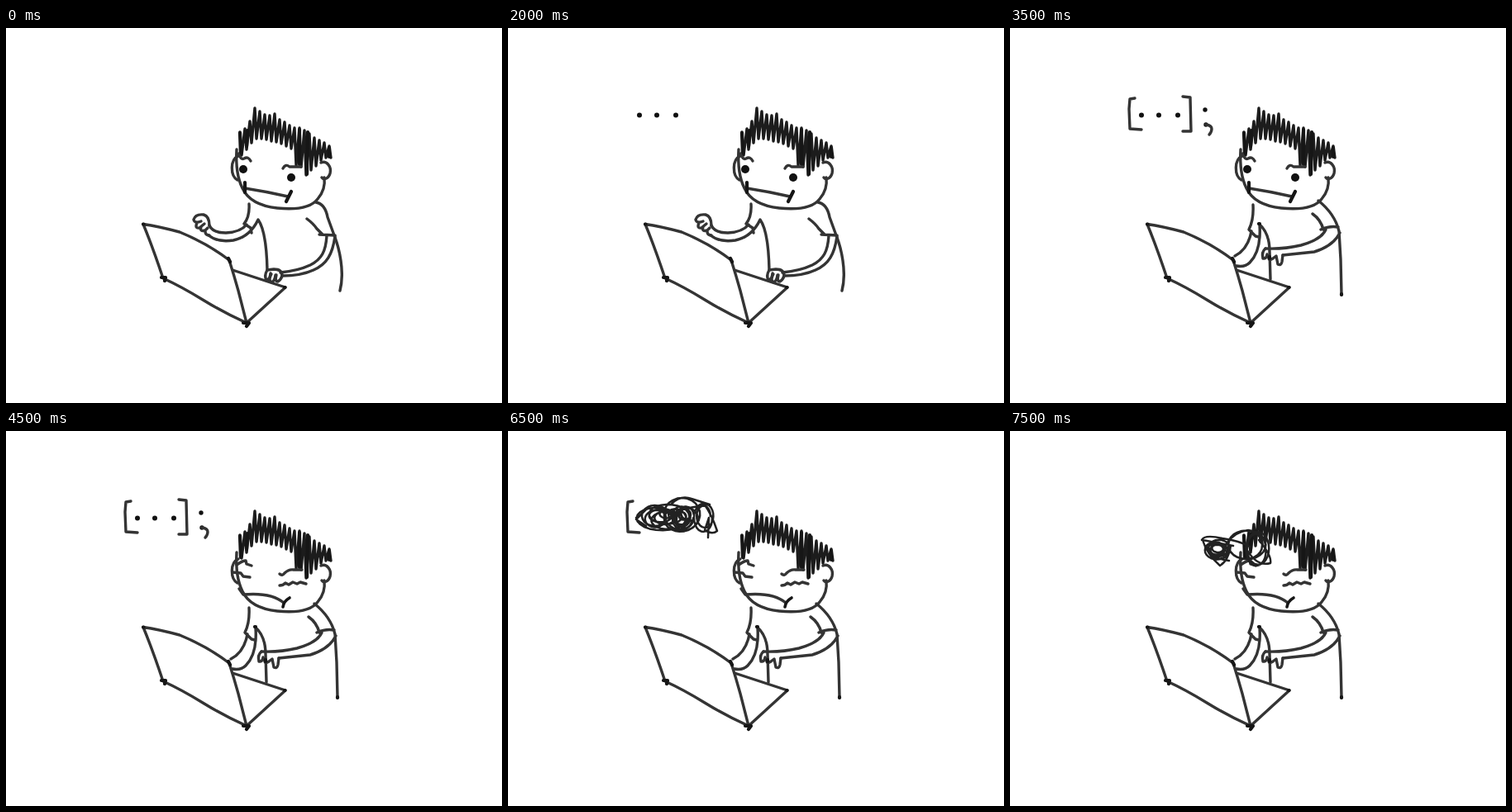
These frames come from a looping animation (600 by 454 pixels, 8000 ms). An HTML page:

```html
<!DOCTYPE html>
<html lang="en">
<head>
<meta charset="utf-8">
<title>Typing</title>
<style>
html, body { margin: 0; width: 100%; height: 100%; overflow: hidden; background: #fff; }
svg { display: block; width: 100vw; height: 100vh; }
.line { fill: none; stroke: #343434; stroke-width: 3.4; stroke-linecap: round; stroke-linejoin: round; filter: blur(0.55px); }
.dot { stroke: none; fill: #111; }
.bold { stroke: #161616; stroke-width: 4.2; }
.scrawl { stroke: #222; stroke-width: 2.5; }
</style>
</head>
<body>
<svg viewBox="0 0 600 454">
<g class="line">
  <!-- laptop -->
  <path d="M166 237.500Q184 240 210 247Q244 261 270 281Q276 300 281 318L291 357 338 314 274 293M166 237.500Q177 264 190 303Q212 313 238 329T291 357"/>
  <path class="bold" d="M166 237.500h.5M269 279l2 4M188 302l5 0-1 4M287 357l7 0-3 4M337 314h.5"/>

  <!-- head -->
  <path d="M279 147C278 164 279 180 286 194C293 209 310 216 328 218C348 220 368 219 377 207C384 199 386 189 385 181"/>
  <path d="M281 155C271 159 271 179 280 184M381 163C388 160 394 168 392 176C390 183 384 184 382 181"/>
  <path id="hair" style="stroke:#1c1c1c"/>
  <path class="bold" d="M283 127L284 153M292 124L291 143M355 123L355 165M365 126L364 177M391 145V156"/>

  <g id="smug">
    <path d="M281 152Q284 160 288 158Q293 155 296 161M335 170Q338 164 343 168L357 168M289 194Q315 198 341 204"/>
    <path class="bold" d="M289 187V199M345 198L339 210"/>
    <circle class="dot" cx="287" cy="171" r="5"/><circle class="dot" cx="345" cy="181" r="5"/>
  </g>
  <g id="cross">
    <path d="M279 162Q286 157 290 157L291 161 297 163M274 171L284 172 287 176 295 177"/>
    <path d="M331 173Q334 176 337 172Q342 167 348 168L358 168M331 187Q335 187 338 184L342 186 347 183 352 185 356 183 363 185"/>
    <path d="M282 191L287 198Q321 195 336 208"/>
    <path class="bold" style="stroke-width:3.600" d="M335 213Q336 206 343 202"/>
  </g>

  <g id="lifted">
    <path d="M294 213Q295 228 288 237L296 242 297 248M291 238Q284 247 266 248Q250 248 246 239M245 251Q256 260 275 257Q295 253 305 232Q315 246 316 293"/>
    <path d="M246 239Q246 228 239 226Q229 225 227 232Q228 237 236 234M231 236Q228 243 234 242L240 237M236 241Q234 247 241 245L244 242M241 246Q241 251 246 251"/>
    <path d="M375 211Q386 213 389 229L397 251C403 266 410 295 404 318M364 231Q372 237 376 243L383 250M379 250L398 251"/>
    <path d="M388 251C387 270 382 280 368 287Q353 294 332 296M398 252C395 274 388 286 372 293Q357 300 334 300"/>
    <path d="M334 300Q334 292 324 292L316 293Q312 300 315 305Q319 305 320 297M321 298Q317 305 321 308Q325 307 326 299M327 299Q325 307 329 307Q333 304 334 300"/>
  </g>
  <g id="lowered">
    <path d="M294 214Q295 232 289 244L297 252 301 253M292 246Q288 268 272 276M302 239Q304 270 290 284Q284 290 274 288M301 237Q314 248 314 270L315 304"/>
    <path d="M373 209Q393 225 398 246L400 280 401 323M366 225Q376 232 379 244M376 244Q387 239 397 241M382 244Q377 256 352 263Q331 268 309 267M399 248Q391 264 368 271L330 275"/>
    <path d="M309 267Q304 271 306 279Q310 280 311 274M313 276Q312 283 318 279L322 276 324 286Q328 288 329 283L330 275"/>
    <path class="bold" d="M301 237h1M401 322v1M314 277v2"/>
  </g>

  <circle id="dot1" class="dot" cx="159" cy="105.500" r="3"/>
  <circle id="dot2" class="dot" cx="180" cy="105.500" r="3"/>
  <circle id="dot3" class="dot" cx="203" cy="105.500" r="3"/>
  <path id="open" d="M151 85L145 86 144 98 145 122 159 123"/>
  <path id="close" d="M209 83L218 84 219 125 209 125"/>
  <g id="semi">
    <circle class="dot" cx="236" cy="99" r="2.700"/><circle class="dot" cx="237" cy="117" r="2.700"/>
    <path d="M237 117Q244 118 244 122Q244 126 241 129"/>
  </g>
  <g id="scrawls"></g>
</g>
</svg>
<script>
const $ = id => document.getElementById(id);

// Hair: one zigzag between an upper and a lower outline
const tips = [126, 122, 113, 97, 101, 105, 106, 104, 111, 114, 118, 121, 121, 124, 128, 133, 136, 139, 143];
const roots = [154, 147, 139, 134, 134, 135, 137, 138, 140, 143, 146, 166, 168, 178, 172, 167, 160, 157, 157];
$("hair").setAttribute("d", tips.map((y, i) => {
  const x = 283 + i * 6;
  return `${i ? "L" : "M"}${x} ${y}L${x + 2} ${roots[i]}`;
}).join(""));

// Wobbling loops around an ellipse
function loops(cx, cy, rx, ry, turns, wobble = 0.35) {
  let d = "";
  for (let i = 0; i <= turns * 24; i++) {
    const a = i * Math.PI / 12;
    const r = 1 - wobble * (0.5 + 0.5 * Math.sin(a * 0.37 + cx));
    const x = cx + rx * (r * Math.cos(a) + wobble * 0.4 * Math.sin(a * 0.23));
    const y = cy + ry * (r * Math.sin(a) + wobble * 0.3 * Math.cos(a * 0.31));
    d += `${i ? "L" : "M"}${x.toFixed(1)} ${y.toFixed(1)}`;
  }
  return d;
}

const rightKnot = loops(207, 98, 10, 14, 2, 0.2) + loops(215, 109, 9, 15, 3)
  + loops(217, 108, 5, 10, 5) + "M206 119Q205 130 212 129L223 112";
const leftKnot = "M163 106L176 98Q178 108 173 117L164 107 176 104 170 111 175 114"
  + "M173 102Q178 92 189 95Q194 99 188 105Q180 109 176 104Q182 97 184 105M179 107Q195 111 203 98";
const bridge = loops(188, 105, 24, 14, 3) + loops(205, 104, 20, 18, 3);
const cloud = loops(188, 105, 31, 16, 3, 0.5) + loops(208, 105, 24, 21, 3, 0.5)
  + loops(176, 105, 18, 14, 2) + loops(212, 103, 12, 13, 5, 0.6)
  + loops(187, 103, 15, 9, 3, 0.6) + loops(236, 104, 12, 17, 2, 0.3)
  + "M168 94L155 107 167 115M155 105l2 5M198 88Q209 77 222 82L244 89 213 94"
  + "M237 88Q247 102 253 121Q247 126 238 120L243 105 242 129";
const drifting = loops(212, 116, 31, 18, 3) + loops(239, 123, 28, 18, 3)
  + loops(220, 117, 17, 10, 4) + "M181 112L196 102 239 104";
const landed = "M270 139Q245 134 232 132Q235 125 257 130Q278 133 290 140"
  + "M233 132Q238 149 254 163Q264 157 267 139M238 140Q242 154 265 157"
  + loops(251, 144, 15, 12, 3) + loops(250, 143, 10, 7, 3)
  + loops(285, 138, 23, 18, 2, 0.15) + loops(298, 143, 14, 21, 2, 0.25)
  + "M262 136Q272 122 288 120Q303 122 305 138M285 141Q298 165 315 160Q317 151 301 132";

const scrawls = [rightKnot, rightKnot + leftKnot, rightKnot + leftKnot + bridge, cloud, drifting, landed];
$("scrawls").innerHTML = scrawls.map(d => `<path class="scrawl" d="${d}"/>`).join("");

const show = (el, on) => { el.style.display = on ? "" : "none"; };

function draw(now) {
  const step = Math.floor(now % 8000 / 500);
  const during = (id, from, to) => show($(id), step >= from && step < to);
  show($("lifted"), step % 2 === 0);
  show($("lowered"), step % 2 === 1);
  during("smug", 0, 8);
  during("cross", 8, 16);
  during("dot1", 2, 11);
  during("dot2", 3, 11);
  during("dot3", 4, 11);
  during("close", 6, 10);
  during("semi", 7, 12);
  // The opening bracket flickers once the scribbling starts
  show($("open"), step >= 5 && step < 10 || step === 11 || step === 13);
  [...$("scrawls").children].forEach((el, i) => show(el, step === 10 + i));
}

const start = performance.now();
function tick() {
  draw(performance.now() - start);
  requestAnimationFrame(tick);
}
tick();
</script>
</body>
</html>
```
